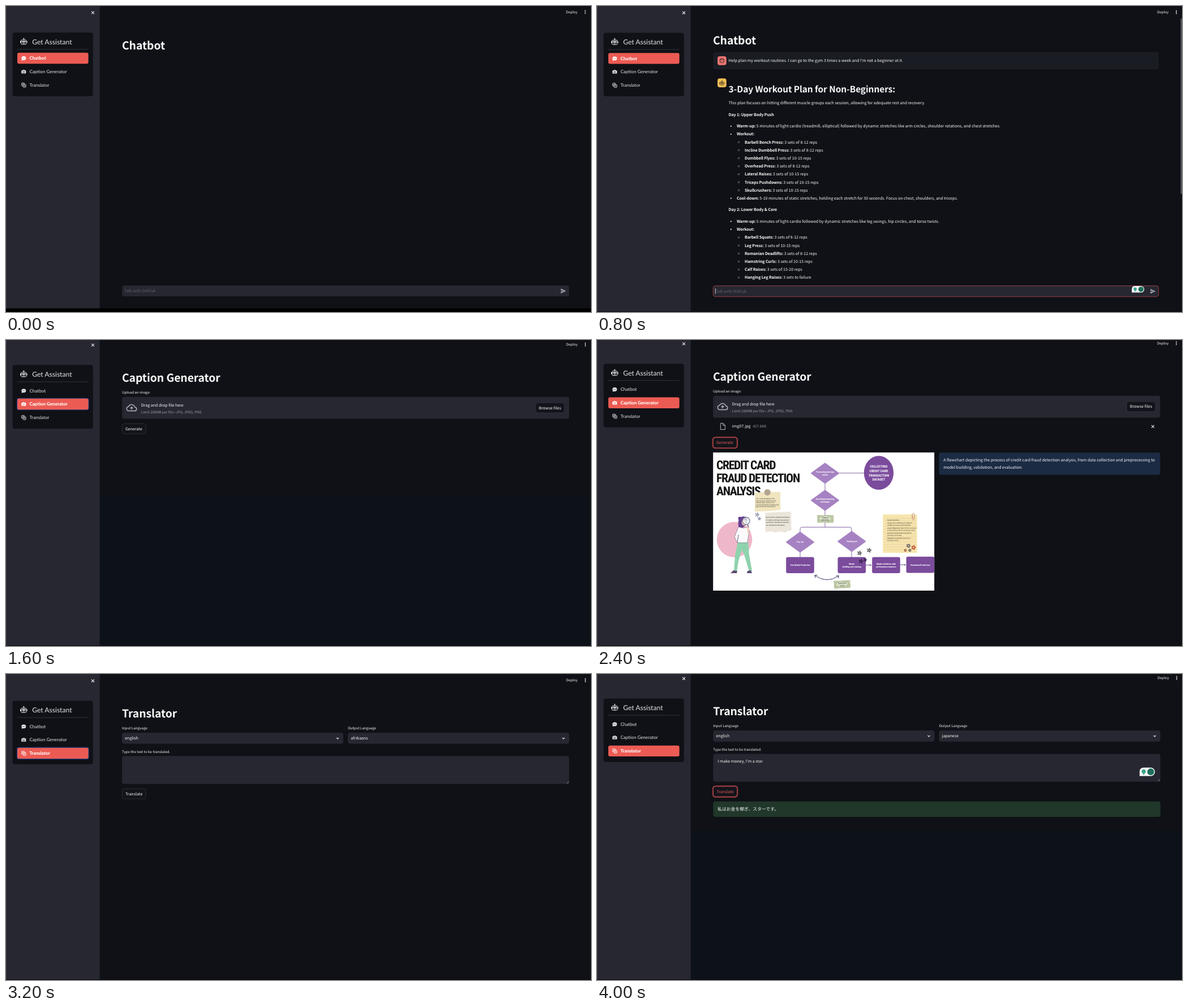
Recreate the animation shown at these times as an HTML page. Size 1034 px wide and 542 px high, loop 4800 ms.

```html
<!DOCTYPE html>
<html lang="en">
<head>
<meta charset="utf-8">
<title>Assistant demo</title>
<style>
html, body { margin: 0; width: 100%; height: 100%; overflow: hidden; background: #0f1116; }
svg { display: block; width: 1034px; height: 542px; }
text { font-family: "Noto Sans CJK JP", "Noto Sans CJK SC", "Noto Sans CJK", sans-serif; font-size: 7.06px; fill: #fafafa; text-rendering: geometricPrecision; white-space: pre; }
.h1 { font-size: 19.4px; font-weight: 700; letter-spacing: -.005em; }
.h2 { font-size: 15.45px; font-weight: 600; letter-spacing: -.005em; }
.small { font-size: 6.18px; }
.dim { fill: #9d9ea4; }
.hint { fill: #62636b; }
.red { fill: #e35d56; }
.ja { font-size: 7.83px; }
.b { font-weight: 600; letter-spacing: -.12px; }
.menu { font-family: Lato, sans-serif; font-size: 8.1px; fill: #e4e4e6; }
.on { font-weight: 800; fill: #fff; }
.brand { font-size: 12.1px; }
.poster { font-family: "Roboto Condensed", "Liberation Sans Narrow", "Open Sans Condensed", Roboto, sans-serif; font-stretch: condensed; font-weight: 700; }
.title { font-size: 21.7px; letter-spacing: -1.3px; fill: #151515; }
.node { font-size: 4px; fill: #fff; text-anchor: middle; }
.round { font-size: 6px; fill: #fff; text-anchor: middle; }
.tape { font-size: 3.6px; font-weight: 400; fill: #333; text-anchor: middle; }
.note { font-family: Roboto, sans-serif; font-size: 2.9px; fill: #2b2925; }
</style>
</head>
<body>
<svg id="stage" viewBox="0 0 1034 542"></svg>
<script>
const HOLD = 800;
const PANEL = '#262730', BG = '#0f1116', CORAL = '#ec5b53';
const PURPLE = '#7b4b9c', LILAC = '#a682c2';

const text = (x, y, s, cls = '') => `<text x="${x}" y="${y}" class="${cls}">${s}</text>`;
const lines = (x, y, step, list, cls) => list.map((s, i) => text(x, y + i * step, s, cls)).join('');
const box = (x, y, w, h, fill, r = 4, extra = '') =>
  `<rect x="${x}" y="${y}" width="${w}" height="${h}" rx="${r}" fill="${fill}" ${extra}/>`;
const dot = (x, y, r, fill, extra = '') => `<circle cx="${x}" cy="${y}" r="${r}" fill="${fill}" ${extra}/>`;
const line = (d, color = '#fafafa', w = 1, extra = '') =>
  `<path d="${d}" fill="none" stroke="${color}" stroke-width="${w}" ${extra}/>`;
const shape = (d, fill, extra = '') => `<path d="${d}" fill="${fill}" ${extra}/>`;
const at = (x, y, body, more = '') => `<g transform="translate(${x} ${y}) ${more}">${body}</g>`;

const cross = (x, y, r = 2.4) => line(`M${x - r} ${y - r}l${2 * r} ${2 * r}m0 ${-2 * r}l${-2 * r} ${2 * r}`, '#f0f0f0', 1.1);
const chevron = (x, y) => line(`M${x - 2} ${y - 1}l2 2 2-2`, '#f0f0f0', 1.2);
const sendIcon = (x, y) => shape(`M${x} ${y - 4.2}l9.3 4.2-9.3 4.2v-3.3l6-.9-6-.9z`, '#a0a1a7');

const robot = (x, y, color, hole, k = 1) => at(x, y,
  line('M0-6v3M-1.2-5.6h2.4M-5.8-1v3.2M5.8-1v3.2', color, 1) +
  box(-4.8, -3, 9.6, 7.8, hole, 2, `stroke="${color}"`) +
  box(-3.5, -1.3, 7, 2.8, color, 1.2) + dot(-1.7, .1, .7, hole) + dot(1.7, .1, .7, hole) +
  line('M-1.8 3.2h3.6', color, .8), `scale(${k})`);

const icons = [
  (c, bg) => `<ellipse rx="4" ry="3.4" fill="${c}"/>` + shape('M-3 1.5l-.8 2.7 3-1z', c) +
    [-1.8, 0, 1.8].map(x => dot(x, 0, .55, bg)).join(''),
  (c, bg) => box(-4, -2.3, 8, 5.5, c, 1) + box(-1.8, -3.3, 3.6, 2, c, .6) +
    dot(0, .5, 1.9, bg) + dot(0, .5, 1.2, c),
  (c, bg) => box(-3.7, -3.7, 5, 5, bg, .7, `stroke="${c}" stroke-width=".9"`) +
    line('M-2.3.1l1.1-2.7 1.1 2.7', c, .7) +
    box(-1.1, -1.1, 4.9, 4.9, bg, .7, `stroke="${c}" stroke-width=".9"`) +
    line('M.1.5h2.6M.5 2.8l1.8-2.2M.7 1l1.8 1.8', c, .6),
];

function sidebar(active, glow) {
  const items = ['Chatbot', 'Caption Generator', 'Translator'].map((name, i) => {
    const y = 92.5 + i * 23.75, on = i === active;
    const ring = on && glow ? box(18.8, y - 10.8, 128, 21.6, '#183a78', 4) : '';
    return ring + (on ? box(20, y - 9.7, 125.6, 19.4, CORAL, 3) : '') +
      at(31.3, y, icons[i](on ? '#fff' : '#e8e8ea', on ? CORAL : BG)) +
      text(41.4, y + 2.8, name, on ? 'menu on' : 'menu');
  });
  return cross(153.5, 11.7) + box(11.7, 47, 142, 112.7, BG) +
    robot(31.3, 63, '#f0f0f2', BG) + text(46.2, 67.5, 'Get Assistant', 'menu brand') +
    line('M20 76.7H145.6', '#3d3e46', .8) + items.join('');
}

function page({ dy = 0, dx = 0, active, glow, foot = 1, tint, body }) {
  const dots = [-2.5, 0, 2.5].map(d => dot(1023.7 + dx, 10.6 + d + dy, .9, '#f5f5f5')).join('');
  return box(0, 0, 1034, 542, BG, 0) +
    (tint ? box(166, 275, 868, 267, '#0d1118', 0) : '') +
    box(0, 0, 165.7, 542, PANEL, 0) + box(0, 0, .8, 542, '#3c3d45', 0) +
    at(0, dy, sidebar(active, glow)) +
    text(989.8 + dx, 12.9 + dy, 'Deploy', 'small') + dots + body +
    box(0, 542 - foot, 1034, foot, foot > 1 ? '#000' : '#0a0b0e', 0);
}

function button(x, y, w, label, hot) {
  const ring = hot ? box(x - .4, y - .4, w + .8, 19.4, 'none', 4.4, 'stroke="#8f3a3f" stroke-width="2"') : '';
  return ring + box(x + .3, y + .3, w - .6, 18, '#13141b', 4, `stroke="${hot ? '#d9504f' : '#3a3b43'}" stroke-width=".7"`) +
    text(x + 6, y + 11.7, label, hot ? 'red' : '');
}

// Writing-helper badge: a white tab with two plain marks.
const badge = (x, y, w, h) =>
  shape(`M${x} ${y + h}v${-h / 2}q0 ${-h / 2} ${h / 2} ${-h / 2}h${w - h}a${h / 2} ${h / 2} 0 0 1 0 ${h}z`, '#f4f6f5') +
  dot(x + w * .27, y + h * .45, h * .24, '#35a58a') + box(x + w * .27 - 1, y + h * .68, 2, h * .16, '#35a58a', .5) +
  dot(x + w - h / 2, y + h / 2, h * .4, '#1d6f5d');

const prompt = (y, w, ring) =>
  box(205.3, y, w, 19.2, PANEL, 4, ring ? 'stroke="#a8454a" stroke-width=".9"' : '') +
  text(209, y + 12.2, 'Talk with OrbTuk', 'hint') + sendIcon(205 + w - 14.3, y + 9.6);

// Rows: indent level, baseline, bold part, rest
const plan = [
  [0, 174, '', 'This plan focuses on hitting different muscle groups each session, allowing for adequate rest and recovery.'],
  [0, 194.5, 'Day 1: Upper Body Push', ''],
  [1, 215.2, 'Warm-up:', '5 minutes of light cardio (treadmill, elliptical) followed by dynamic stretches like arm circles, shoulder rotations, and chest stretches.'],
  [1, 229.4, 'Workout:', ''],
  ...['Barbell Bench Press:|3 sets of 8-12 reps', 'Incline Dumbbell Press:|3 sets of 8-12 reps',
    'Dumbbell Flyes:|3 sets of 10-15 reps', 'Overhead Press:|3 sets of 8-12 reps',
    'Lateral Raises:|3 sets of 10-15 reps', 'Triceps Pushdowns:|3 sets of 10-15 reps',
    'Skullcrushers:|3 sets of 10-15 reps'].map((s, i) => [2, 243.6 + i * 14.2, ...s.split('|')]),
  [1, 343, 'Cool-down:', '5-10 minutes of static stretches, holding each stretch for 30 seconds. Focus on chest, shoulders, and triceps.'],
  [0, 363.4, 'Day 2: Lower Body &amp; Core', ''],
  [1, 383.9, 'Warm-up:', '5 minutes of light cardio followed by dynamic stretches like leg swings, hip circles, and torso twists.'],
  [1, 398.1, 'Workout:', ''],
  ...['Barbell Squats:|3 sets of 8-12 reps', 'Leg Press:|3 sets of 10-15 reps',
    'Romanian Deadlifts:|3 sets of 8-12 reps', 'Hamstring Curls:|3 sets of 10-15 reps',
    'Calf Raises:|3 sets of 15-20 reps', 'Hanging Leg Raises:|3 sets to failure',
  ].map((s, i) => [2, 412.3 + i * 14.2, ...s.split('|')]),
];

const bullets = [() => '', y => dot(236.8, y, 1.1, '#fafafa'),
  y => dot(250.5, y, 1.3, 'none', 'stroke="#c8c8cc" stroke-width=".5"')];
const planRow = ([level, y, bold, rest]) => bullets[level](y - 2.4) +
  text([232.6, 246.9, 261][level], y, (bold && `<tspan class="b">${bold}</tspan> `) + rest);

function chat() {
  const face = dot(220.8, 96.8, 3.8, 'none', 'stroke="#3a2226" stroke-width="1"') +
    dot(219.4, 97, .6, '#3a2226') + dot(222.2, 97, .6, '#3a2226') + line('M217.5 95.4q3.5 0 4.2-2 1 1.8 2.6 1.8', '#3a2226', .8);
  return text(205, 68.2, 'Chatbot', 'h1') +
    box(205.3, 81.8, 787.6, 30.4, '#1a1c24') +
    box(213, 89, 15.7, 15.7, '#ea7571') + face +
    text(232.6, 99.2, "Help plan my workout routines. I can go to the gym 3 times a week and I'm not a beginner at it.") +
    box(213, 128.2, 15.7, 15.7, '#f0bd55') + robot(220.8, 136.5, '#33291a', '#f0bd55', .72) +
    text(232.6, 152.8, '3-Day Workout Plan for Non-Beginners:', 'h2') +
    plan.map(planRow).join('') + prompt(495.6, 787.4, true) +
    line('M209.3 500v10', '#f0f0f0', .8) + badge(945.3, 496, 22, 11.6) +
    box(1031.5, 22, 2.5, 311, '#54555c', 1);
}

function uploader(y) {
  return text(205, y - 26.5, 'Caption Generator', 'h1') + text(205, y - 5.6, 'Upload an image:', 'small') +
    box(205.2, y, 790.2, 38.8, PANEL) +
    at(222, y + 19.5, line('M-5 5.3a3.9 3.9 0 0 1-.6-7.7 6 6 0 0 1 11.2 1 3.2 3.2 0 0 1-.4 6.7z', '#b4b5ba', 1.5) +
      line('M0 3v-4.2M-2.2.6l2.2-2.2 2.2 2.2', '#b4b5ba', 1.4)) +
    text(238.8, y + 16.8, 'Drag and drop file here') +
    text(238.8, y + 29.3, 'Limit 200MB per file • JPG, JPEG, PNG', 'small dim') +
    button(935.8, y + 10, 51.6, 'Browse files');
}

const diamond = (x, y, ...label) =>
  shape(`M${x - 24} ${y}L${x} ${y - 17.5} ${x + 24} ${y} ${x} ${y + 17.5}z`, LILAC, `stroke="${LILAC}" stroke-width="2" stroke-linejoin="round"`) +
  lines(x, y + 1.4 - (label.length - 1) * 2.3, 4.8, label, 'poster node');
const card = (x, y, ...label) => box(x, y, 49.6, 28.6, PURPLE, 3) +
  lines(x + 24.8, y + 15.8 - (label.length - 1) * 2.4, 5, label, 'poster node');
const tape = (x, y, turn, ...label) => at(x, y,
  shape('M-15-6l4-.6 8 .5 9-.6 9 .6-.6 4 .8 4-.8 5-10 .4-9-.6-9 .7-1-4 .7-4z', '#bdc9a4') +
  `<ellipse rx="11" ry="5" fill="#d8dfc4" stroke="#8e9a78" stroke-width=".4"/>` +
  lines(0, -.6, 4.4, label, 'poster tape'), `rotate(${turn})`);
const star = (x, y, r, color) => {
  const p = [0, 2, 4, 1, 3].map(i => {
    const a = i * Math.PI * .4 - 1.3;
    return `${(x + r * Math.cos(a)).toFixed(1)} ${(y + r * Math.sin(a)).toFixed(1)}`;
  });
  return line(`M${p.join('L')}z`, color, .8);
};
const flower = (x, y, color, r) => [0, 1, 2, 3, 4].map(i =>
  dot(x + r * Math.cos(i * 1.257), y + r * Math.sin(i * 1.257), r * .7, color)).join('') + dot(x, y, r * .6, '#e9c46a');

const woman = dot(243, 353.5, 31.3, '#efb8ca') +
  shape('M250 329q-2-13 6-16 8-2 9 6l-1 8-7 6-2 10-5-2z', '#66408f') + dot(252.5, 316, 3, '#66408f') +
  `<ellipse cx="260" cy="323" rx="4.3" ry="5.5" fill="#f2cdb9"/>` +
  shape('M249 357h18l2 24 5 28-5 1-9-30-4-8-6 20-3 19-5-1 2-28z', '#8fd3ae') +
  shape('M241 408l7 1-1 4h-11zM266 409l6-1 2 5h-9z', '#5a4a70') +
  shape('M250 331l8 2 7-1 5 6-2 7-2 14h-18l2-14-2 14-5-10z', '#fafafa', 'stroke="#67597a" stroke-width=".6"') +
  line('M268 343l-2-15', '#f2cdb9', 3) + dot(263.5, 320.5, 6.6, '#dff0f4', 'fill-opacity=".7" stroke="#6f6787" stroke-width="1.2"') +
  line('M266 326l2 6', '#6f6787', 1.4);

const notes =
  shape('M279 270l45-1 .5 32-20 2-25.5 1z', '#f0e5bf') + dot(301.2, 269.8, 5.6, '#b3a58f') +
  lines(280.5, 282, 3.5, ['Use  undersampling of the', 'majority data where the new', 'sample data consists of a',
    'normal distribution between the', 'legit and fraud transactions.'], 'note') +
  shape('M297 306l46-2 .5 33-6 1-5 3-9-2-8 2-8-2-10 1z', '#ebe5da') +
  lines(298.5, 315, 4.6, ['Deal with an unbalanced dataset', 'of credit card fraud transactions',
    'and build a classifier model that', 'can identify the fraudsters.'], 'note') +
  box(505, 309, 61, 68, '#f6e5ac', 1) +
  line('M505 309v68M566 309v68', '#fff', 1.6, 'stroke-dasharray="1.6 3"') +
  Array.from({ length: 13 }, (_, i) => line(`M507 ${316 + i * 4.6}h57`, '#dfbfa0', .5)).join('') +
  lines(513, 320, 4.55, ['Model Detection:', 'Using cross validation to check for', 'models accuracy and found that,',
    'LogisticRegression has 94.0 % accuracy', 'score, SVC has 53.0 % accuracy score,', 'DecisionTreeClassifier has 89.0 %',
    'accuracy score and,', 'KNeighborsClassifier has 92.0 %', 'accuracy score'], 'note') +
  line('M557 317v-8q2-4 4 0v8q-2 4-3 0v-6', '#c98f82', 1) +
  flower(550.5, 364.5, '#6c6a73', 2.2) + flower(559.5, 367.5, '#c85a4a', 2.4) +
  flower(545, 372.5, '#8c4a3c', 1.5) + flower(553, 372.5, '#554f5c', 1.6);

const ends = 'marker-end="url(#tip)"';
const poster = box(205.2, 199.2, 391, 244.7, '#fff', 0) +
  lines(211, 229, 23.2, ['CREDIT CARD', 'FRAUD DETECTION', 'ANALYSIS'], 'poster title') +
  line('M472 235.7H428M403 252v16M403 300v31.5M359 341v-6q0-3.500 3.500-3.500h84q3.500 0 3.500 3.500v6M359 375v10M450 374v11', '#79599c', .9) +
  line('M475 398.700h10', '#5d4480', .9, ends) + line('M536 398.200h9.500', '#5d4480', .9, ends) +
  diamond(403, 236, 'Processing missing', 'values') + diamond(403, 284, 'Over/Undersampling', 'technique') +
  diamond(359, 358, 'Test set') + diamond(450.2, 356.7, 'Training set') +
  `<ellipse cx="498" cy="235.300" rx="26.200" ry="30" fill="${PURPLE}"/>` +
  lines(498, 226.300, 7.700, ['COLLECTING', 'CREDIT CARD', 'TRANSACTION', 'DATASET'], 'poster round') +
  card(334.2, 384.4, 'Test Model Prediction') + card(425.500, 384.400, 'Model', 'building and training') +
  card(486.2, 384.4, 'Model validation with', 'performance measure') + card(546.600, 383.800, 'Evaluation/Prediction') +
  tape(403.500, 316.500, 0, 'Feature', 'detection') + tape(433, 432.500, -3, 'Train/Test', 'Loop') +
  line('M385 417q21 15 42 1M389.500 416.500l-4.700.3 1.300 4.500M422.500 417.800l4.700-.2-.8 4.500', '#43356b', 1) +
  woman + notes + star(283, 309.5, 4, '#777b9a') + star(287, 316.5, 3, '#777b9a') +
  star(464, 377.5, 4.2, '#222') + star(481, 372.5, 4.2, '#222') + star(466.5, 392, 4, '#2a1838') + star(474, 389.5, 3.2, '#2a1838');

function caption() {
  return uploader(98.7) +
    line('M218.300 147.500h4.700l3.400 3.400v7.700h-8.100zM222.700 147.700v3.500h3.500', '#b4b5ba', 1) +
    text(238.8, 155.2, 'img07.jpg') + text(275.5, 155.2, '457.8KB', 'small dim') + cross(982.5, 153.2) +
    button(205, 172.6, 42.7, 'Generate', true) + poster +
    box(604.4, 199.2, 391, 39.6, '#1b2b43') +
    lines(612.2, 215.4, 12.3, ['A flowchart depicting the process of credit card fraud detection analysis, from data collection and preprocessing to',
      'model building, validation, and evaluation.']);
}

const select = (x, y, label, value) => text(x, y - 5.7, label, 'small') +
  box(x, y, 391.2, 19.6, PANEL) + text(x + 5.2, y + 12.1, value) + chevron(x + 381.2, y + 9.8);

function translator(x, y, language, hot, extra = '') {
  return at(x, y, text(0, 76.8, 'Translator', 'h1') +
    select(0, 104, 'Input Language', 'english') + select(399.2, 104, 'Output Language', language) +
    text(0, 139.5, 'Type the text to be translated.', 'small') + box(0, 145.3, 790.4, 49.4, PANEL) +
    line('M785.800 194l4-4M788 194l1.800-1.800', '#b0b1b6', .6) +
    button(0, 202.8, 42.6, 'Translate', hot) + extra);
}

const scenes = [
  page({ active: 0, foot: 6.4, body: text(205, 76.6, 'Chatbot', 'h1') + prompt(495.1, 790) }),
  page({ dy: .4, dx: .3, active: 0, body: chat() }),
  page({ dy: -2.7, dx: .3, active: 1, glow: true, tint: true, body: uploader(100.8) + button(205, 147.8, 42.6, 'Generate') }),
  page({ dy: -5, dx: .3, active: 1, body: caption() }),
  page({ dy: .4, dx: .3, active: 2, glow: true, body: translator(205, 0, 'afrikaans') }),
  page({ dy: -3.6, dx: .9, active: 2, tint: true, body: translator(205.3, -3.9, 'japanese', true,
    text(8, 161.3, "I make money, I'm a star.") + badge(753.7, 169.7, 27.2, 15) +
    box(0, 229.6, 790.6, 27.4, '#20372a') + text(7.8, 246, '私はお金を稼ぎ、スターです。', 'ja')) }),
];

const stage = document.getElementById('stage');
stage.innerHTML = '<defs><marker id="tip" markerWidth="4" markerHeight="4" refX="3" refY="2" orient="auto"><path d="M0 .5L3.500 2 0 3.500z" fill="#5d4480"/></marker></defs>' +
  scenes.map(s => `<g display="none">${s}</g>`).join('');
const layers = [...stage.children].slice(1);

function tick() {
  const current = Math.floor(performance.now() / HOLD) % layers.length;
  layers.forEach((layer, i) => layer.setAttribute('display', i === current ? 'inline' : 'none'));
  requestAnimationFrame(tick);
}
tick();
</script>
</body>
</html>
```
